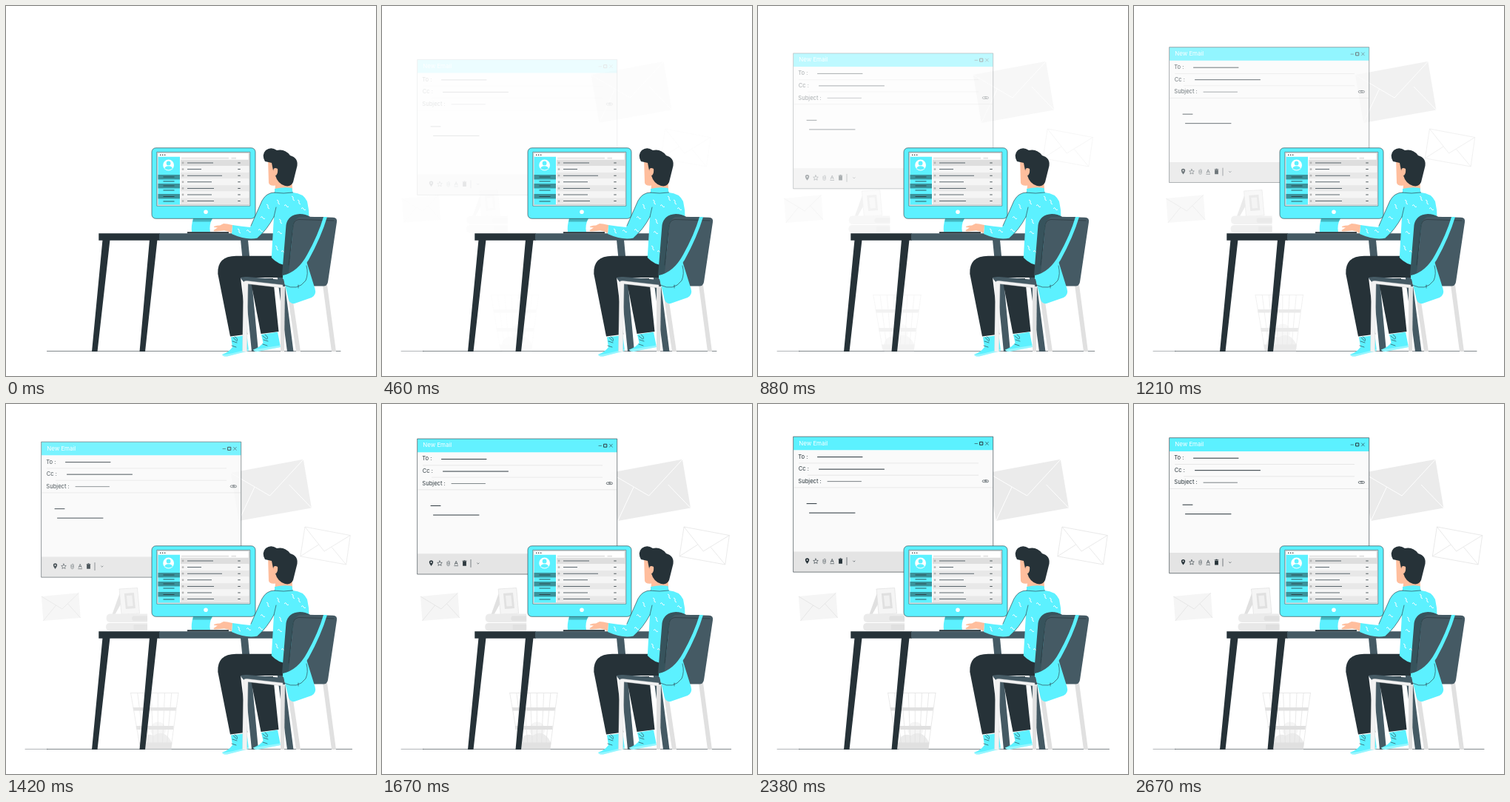
Animation, 500 px wide and 500 px high, one loop 2.71 s. Source, as an HTML page:

```html
<!DOCTYPE html>
<html lang="en">
<head>
<meta charset="utf-8">
<title>New email</title>
<style>
html,body{margin:0;width:100%;height:100%;overflow:hidden;background:#fff}
svg{display:block;width:100vw;height:100vh}
text{font-family:Inter,"Open Sans",sans-serif;font-weight:400}
.c{fill:#5cf1ff}.d{fill:#263238}.s{fill:#455a64}.k{fill:#ffbe9d}
.l{fill:none;stroke:#263238;stroke-width:.6;stroke-linecap:round;stroke-linejoin:round}
.b{stroke-width:1}
.w{fill:none;stroke:#fff;stroke-width:1;stroke-linejoin:round}
.g{fill:none;stroke:#e0e0e0;stroke-width:.7;stroke-linejoin:round}
</style>
</head>
<body>
<svg viewBox="0 0 500 500">
  <path id="floor" class="l"/>
  <path id="floorEnd" class="l" opacity=".6" d="M26 466.4H56"/>

  <g id="back">
    <path fill="#ebebeb" d="M309 93 407.3 74.8 418.4 140.5 320 158Z"/>
    <path class="w" d="M309 93 362 124 407.3 75M320 158 341.5 112M388 109 418.4 140.5"/>
    <path class="g" style="fill:#fff" d="M409.4 166 470.7 177.5 465.1 217 403.3 205.8Z"/>
    <path class="g" d="M409.4 166 435.5 199 470.7 177.5M403.3 205.8 428 190M445.5 193.5 465.1 217"/>
    <path fill="#f5f5f5" d="M53.3 260 103.8 255.3 106.2 289 55.8 293Z"/>
    <path class="g" d="M53.3 260 81.3 277 103.8 255.3M55.8 293 73 272M89 270 106.2 289"/>
    <path fill="#e0e0e0" d="M159 256 149 284H153L163 266Z"/>
    <path fill="#f5f5f5" stroke="#e0e0e0" stroke-width=".7" d="M158.5 250 183 248.5 186 283 161.5 284.5Z"/>
    <path fill="#e0e0e0" d="M165.3 256 178.3 255 180.3 276 167.3 277Z"/>
    <path fill="#f0f0f0" d="M168.3 259 175.8 258.5 177.1 273 169.8 273.5Z"/>
    <path fill="#ebebeb" d="M146 283.5H196.5V295H146Q141 294.5 141 289.5Q141 284 146 283.5Z"/>
    <path fill="#e0e0e0" d="M177 286.5H196.5V293H177Q174 290 177 286.5Z"/>
    <path fill="#e8e8e8" d="M145 296H196.5V306.5H145Q140.5 306 140.5 301Q140.5 296.500 145 296Z"/>
    <path fill="#e0e0e0" d="M178 298H196.5V305H178Z"/>
    <circle cx="211" cy="440" r="10.5" fill="#f5f5f5"/>
    <path fill="#ebebeb" d="M188 458Q192 443 205 448Q220 438 230 458L229 466.5H189Z"/>
    <path id="ribs" class="g"/>
    <path fill="#e0e0e0" d="M177 410H235.5L235 414.5H177.6ZM181 435H232L231.5 440H181.8ZM185 457.5H229.5L228.5 466H187Z"/>
  </g>

  <g id="win">
    <path fill="#fafafa" d="M48 45.7H317.7V228.7H48Z"/>
    <path fill="#e4e4e4" d="M48 201H317.7V228.7H48Z"/>
    <path class="c" d="M48 45.7H317.7V63.9H48Z"/>
    <path class="l" d="M48 45.7H317.7V228.7H48Z"/>
    <text x="55.3" y="57.1" font-size="7.9" fill="#fff">New Email</text>
    <path class="l" d="M293 55.1H296.5M307.5 52.9 311.3 56.9M311.3 52.9 307.5 56.9"/>
    <path class="l b" d="M300 52.9H303.8V56.9H300Z"/>
    <g font-size="7.6" class="d">
      <text x="54.3" y="75.1">To :</text>
      <text x="54.8" y="91.6">Cc :</text>
      <text x="54.3" y="108.4">Subject :</text>
    </g>
    <path class="g" d="M55 81.5H298M67 97.800H298M48 114.5H317"/>
    <path class="l b" d="M80.5 73.2H141M82.5 89.7H170.5M66 136.2H79M69.5 148.7H131"/>
    <path class="l" d="M94 106.2H139.5"/>
    <path class="l" d="M308.5 104.5H305Q303.2 104.5 303.2 105.900T305 107.300H310Q311.5 107.300 311.5 105.900T310 104.500H307Q305.5 105.900 307 106.300H309"/>
    <g transform="translate(0 .6)">
      <path class="d" fill-rule="evenodd" d="M66.5 217Q63.8 213.5 63.8 212A2.7 2.7 0 0 1 69.2 212Q69.2 213.5 66.5 217ZM65.5 212A1 1 0 0 0 67.5 212A1 1 0 0 0 65.5 212Z"/>
      <path class="l" d="M78 210 79 212.3 81.3 212.5 79.6 214.1 80.1 216.5 78 215.2 75.9 216.5 76.4 214.1 74.7 212.5 77 212.3Z"/>
      <path class="l" opacity=".7" d="M87.8 211.5V215A1.8 1.8 0 0 0 91.4 215V211.5A1.3 1.3 0 0 0 88.8 211.5V214.5Q89.6 215.7 90.4 214.5V212"/>
      <path class="l" d="M98.3 215 100.2 210.3 102.1 215M98.9 213.4H101.5M97.8 216.7H102.6"/>
      <path class="d" d="M109.1 210.8H113.9V216.8H109.1ZM108.6 209.9H114.4V210.5H108.6ZM110.5 209.2H112.5V210H110.5Z"/>
      <path class="l" d="M120 208.5V218.5M128.6 213 129.8 214.2 131 213"/>
    </g>
  </g>

  <!-- desk -->
  <path class="s" d="M317 316H327L341 467H332ZM360 316H369L388.5 467H380Z"/>
  <path class="d" d="M130.5 316H140.5L123.5 467H116ZM194 316H204.5L188 467H180.5ZM125.3 307.3H208V316.7H125.3Z"/>
  <path class="s" d="M207 307.3H363V316.7H207Z"/>

  <!-- monitor -->
  <path class="c" d="M253 287H279Q274 296 276 305.5H251Q250 297 253 287Z"/>
  <path fill="#43b5bf" d="M253 287H279L276.5 291.5H252.3Z"/>
  <path class="d" d="M245 305.2H301V307.2H245Z"/>
  <rect class="c" x="197" y="191.8" width="140" height="95.5" rx="5.5" stroke="#263238" stroke-width=".6"/>
  <path fill="#fff" stroke="#263238" stroke-width=".5" d="M203.8 197.3H329.8V270.2H203.8Z"/>
  <circle cx="270" cy="278.3" r="2.8" fill="#fff"/>
  <path class="l" d="M205.3 198.5H328.3V268.6H205.3Z" opacity=".4"/>
  <path class="c" d="M205.5 203.8H235V268.5H205.5Z"/>
  <g class="d"><circle cx="208.7" cy="201.3" r=".8"/><circle cx="211.7" cy="201.3" r=".8"/><circle cx="214.7" cy="201.3" r=".8"/></g>
  <path fill="#e0e0e0" d="M237 204.8H301V206.6H237ZM304.5 204.8H311V206.4H304.5Z"/>
  <circle cx="219.6" cy="215" r="7.4" fill="#fff"/>
  <circle class="c" cx="219.6" cy="212.4" r="2.9"/>
  <path class="c" d="M214.4 219.8Q214.700 216.3 219.6 216.3T224.8 219.8Q219.6 223 214.4 219.8Z"/>
  <g id="list"></g>

  <!-- man -->
  <path class="d" d="M330 368 344.5 443 368.5 440 361 368Z"/>
  <path class="d" d="M378 337.8H311Q285 338 286.3 362L303 446.5 326.3 443.5 317 367H378Z"/>
  <path class="c" d="M304 447.5 325.5 445 328 466 299 473.5Q293 474 292 471Q301 468 306 461Z"/>
  <path class="c" d="M345 444 367 440.5 371 461 340 467Q335 467 334 464.5Q345 460 347.5 455Z"/>
  <path fill="#fff" d="M292 471Q302 471 328 463.5V466L299 473.5Q293 474 292 471ZM334 464.5 371 458.5V461L340 467Q335 467 334 464.5Z" opacity=".35"/>
  <path class="l" d="M307 448 311 452M306 453 312 455M305 459 311 461M347 446 352 450M348 451 354 453M347 457 353 459M309 447Q314 449 312 453M350 444Q355 447 353 450"/>
  <path class="k" d="M354 206 355 239Q356 243.5 364 242.5L363.5 249H387L386 220 376 205Z"/>
  <path class="d" d="M350 210Q345 201 351 195Q358 189.500 366 195Q377 192.500 384 202Q395 205 393.500 216L388 238Q385 245 377 243Q367 240 364 229L361 222 359 212Z"/>
  <path class="k" d="M367 220Q361 217 361 224Q361 229 365 229Q368 225 367 220Z"/>
  <path class="c" d="M363 247Q375 244 386.500 246L387.500 252Q402 253 407 264Q410 276 409.500 288L380 350Q368 350 358.800 340L362 285Q353 302 340 313.500Q325 317 305 308L306 296Q319 298 330 299L346 263Q352 252 363 252Z"/>
  <path class="l" d="M363 252.200Q375 254 387.500 252M362 285 365 272M362 285Q353 302 340 313.500M363 252Q352 252 346 263L331 297"/>
  <path id="marks" class="w"/>
  <path class="k" d="M306 296Q298 294 294 294L289 296.500Q280 297 281 299L286 299.500 280.500 303Q280 305 284 304.500L295 303.500Q301 304 305 307Z"/>

  <!-- chair -->
  <path fill="#e0e0e0" d="M381 393H387L398 467H392ZM428 377H434L446 467H440Z"/>
  <path class="s" d="M392 284.300 442 285.700Q448 286 447 292L435 373Q434 378.500 429 378.500H378Z"/>
  <path fill="#37535c" d="M373 364 378.500 296Q381 282 397 281Q405 281 411 284.800L396 288.500Q389 289 388 297L382 363Z"/>
  <path class="s" d="M388 297Q389 289 396 285L430 285 407 338Q393 358 382 362.500Z"/>
  <path class="l" d="M443 290 396 288.500Q389 289 388 297L382 350"/>
  <path class="s" d="M316.800 367.500Q319 365.500 326 366L374 370V381L322 374Z"/>
  <path fill="#e0e0e0" d="M371 379H377L376 467H371Z"/>
  <path fill="#f2f2f2" stroke="#d5d5d5" stroke-width=".4" d="M321 374Q321 371 326 371.500L374 377V381L327 375.500 325.500 467H319.500Z"/>
  <path class="c" d="M374 365Q388 363 406 345L417.500 382Q420 390 413 394L390 402Q384 403 382 397Z"/>
  <path class="c" d="M429 285H434Q426 312 409 343Q396 364 374 369V364Q394 360 407 336Q422 309 429 285Z"/>
  <path class="l" d="M376 377Q394 386 405 371Q409 362 406 351M395 377V381"/>
</svg>
<script>
const $ = id => document.getElementById(id);
const LOOP = 2710, STEP = LOOP / 65, START = 330, MOVE = 2620, SHIFT = 30;

const strip = (x, y, w, h, fill) =>
  `<rect x="${x}" y="${y}" width="${w}" height="${h}" fill="${fill}"/>`;

function buildList() {
  let out = '';
  [35, 19, 47, 33, 36, 33, 36].forEach((len, i) => {
    const y = 212 + i * 8.6;
    out += strip(236, y - 4.3, 92.5, 8.6, i % 2 ? '#f5f5f5' : i ? '#e8e8e8' : '#dedede');
    out += `<circle cx="239" cy="${y}" r="1.4" fill="#b5b5b5"/>`;
    out += strip(245, y - .4, len, .8, '#37474f') + strip(313.3, y - .4, 3.4, .8, '#263238');
  });
  [228, 240, 254].forEach(y => out += strip(205.5, y, 29.5, 6.4, '#3a929b'));
  [231, 237, 243, 249, 257.5, 264].forEach(y => out += strip(212.5, y - .4, 15, .8, '#263238'));
  $('list').innerHTML = out;
}

function buildDetails() {
  let ribs = 'M173.5 390.5H239';
  for (let i = 0; i < 8; i++) ribs += `M${174 + i * 9.2} 390.5L${187 + i * 5.9} 466`;
  $('ribs').setAttribute('d', ribs);
  const spots = [[352, 268], [344, 286], [366, 262], [376, 270], [394, 262], [399, 274],
    [369, 288], [367, 306], [364, 324], [325, 304], [313, 301], [341, 303], [386, 257], [372, 332]];
  $('marks').setAttribute('d', spots.map(([x, y], i) =>
    i % 2 ? `M${x} ${y}q2 -3 3 0t3 1` : `M${x} ${y}q3 1 2 3t2 3`).join(''));
}

// cubic-bezier(.36, -.01, .5, 1.38)
const curve = (s, a, b) => 3 * (1 - s) ** 2 * s * a + 3 * (1 - s) * s * s * b + s ** 3;
function ease(x) {
  let lo = 0, hi = 1;
  for (let i = 0; i < 24; i++) {
    const mid = (lo + hi) / 2;
    if (curve(mid, .36, .5) < x) lo = mid; else hi = mid;
  }
  return curve(lo, -.01, 1.38);
}

function draw(now) {
  const t = now % LOOP;
  const p = ease(Math.min(1, Math.floor(t / STEP + .2) * STEP / MOVE));
  const shown = t >= START;
  const alpha = shown ? Math.max(0, Math.min(1, p)) : 0;
  const off = SHIFT * (1 - p);
  $('back').setAttribute('opacity', alpha);
  $('win').setAttribute('opacity', alpha);
  $('back').setAttribute('transform', `translate(${-off} 0)`);
  $('win').setAttribute('transform', `translate(0 ${off})`);
  $('floorEnd').style.display = shown ? '' : 'none';
  $('floor').setAttribute('d', `M55.5 466.4H${shown ? Math.max(452, 473 - off) : 452}`);
}

buildList();
buildDetails();
const begin = performance.now();
function tick() {
  draw(performance.now() - begin);
  requestAnimationFrame(tick);
}
tick();
</script>
</body>
</html>
```
